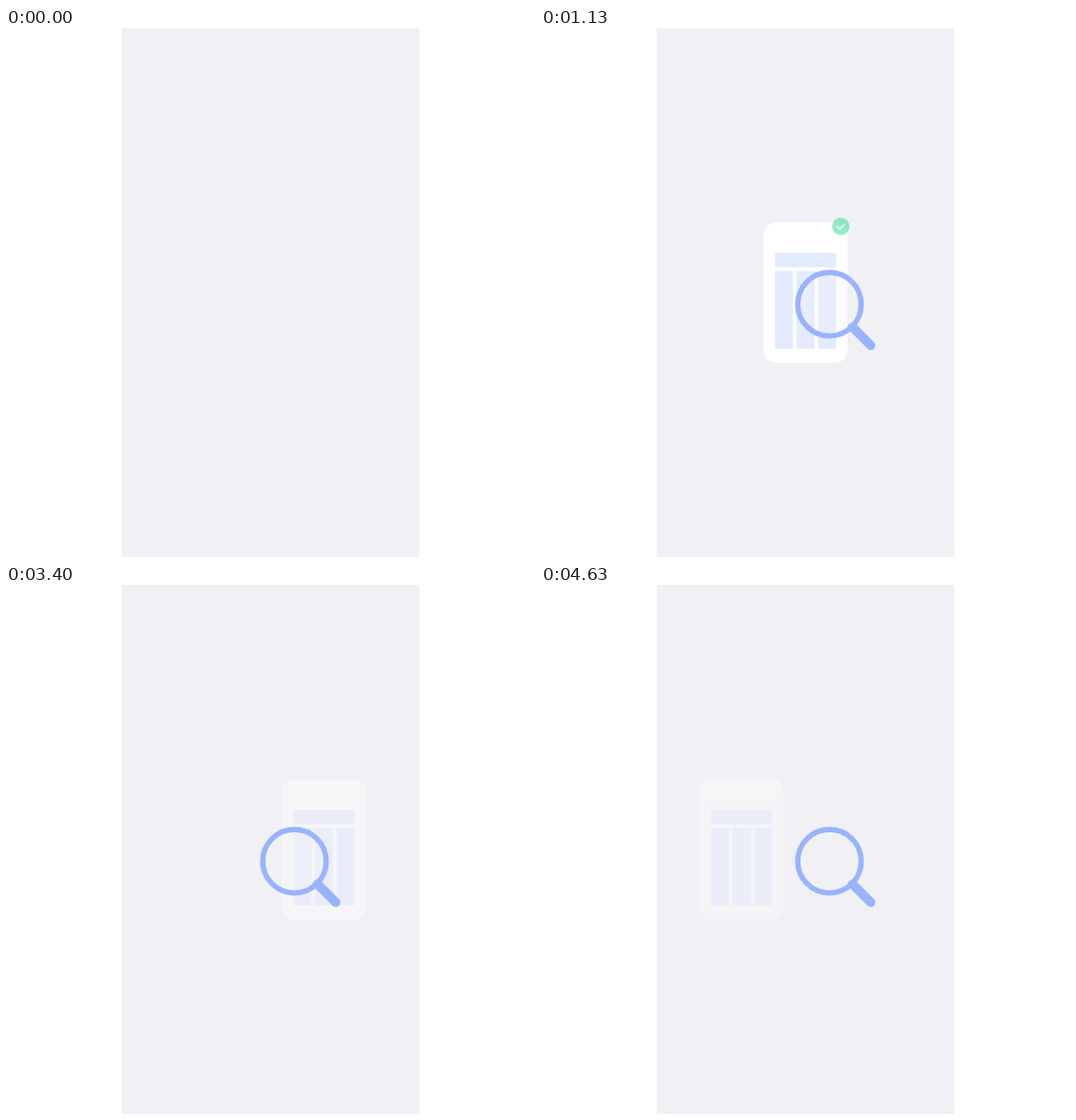
Write an HTML page that moves like this. It is 640x640 px and loops after 6.03 s.

```html
<!DOCTYPE html>
<html lang="en">
<head>
<meta charset="utf-8">
<title>Document search</title>
<style>
  html, body { margin: 0; width: 100%; height: 100%; overflow: hidden; background: #fff; }
  svg { display: block; width: 100vw; height: 100vh; }
</style>
</head>
<body>
<svg viewBox="0 0 640 640">
  <rect x="140" width="360" height="640" fill="#f0f0f5"/>
  <g id="card" opacity="0">
    <rect x="269.2" y="235" width="101.6" height="170" rx="15" fill="#fff"/>
    <g fill="#e4ebff">
      <rect x="283" y="272" width="74.2" height="17.6"/>
      <rect x="283" y="294" width="21.8" height="94.2"/>
      <rect x="309.2" y="294" width="21.8" height="94.2"/>
      <rect x="335.6" y="294" width="21.6" height="94.2"/>
    </g>
  </g>
  <g id="badge" opacity="0">
    <circle r="19" fill="#2bdd92"/>
    <path d="M-7.6 .4L-2.3 5.4L7.7 -4.6" fill="none" stroke="#fff" stroke-width="2.7" stroke-linecap="round" stroke-linejoin="round"/>
  </g>
  <g id="lens" opacity="0">
    <g transform="translate(-356 -341)" stroke="#98b4ff">
      <path d="M376.5 361.5L399 384" stroke-width="11" stroke-linecap="round"/>
      <circle cx="349" cy="334.2" r="38.4" fill="#f0f0f5" fill-opacity=".3" stroke-width="6.4"/>
    </g>
  </g>
</svg>
<script>
const LOOP = 6030, SLIDE = 600, TRAVEL = 120;
const RISE = 340, SETTLE = 160, SHRINK = 300, PEAK = 1.1;
const LENS_IN = 355;
const cycles = [
  { enter: 420, badge: 960, leave: 1545 },
  { enter: 3124, badge: 3586, leave: 4245 }
];

const [card, badge, lens] = ['card', 'badge', 'lens'].map(id => document.getElementById(id));
const ramp = (t, start, length) => Math.min(1, Math.max(0, (t - start) / length));

// Grow past full size while fading in, then settle.
function pop(t, start) {
  const rise = ramp(t, start, RISE);
  const settle = ramp(t, start + RISE, SETTLE);
  return { scale: PEAK * rise - (PEAK - 1) * settle, alpha: rise };
}

function place(el, x, y, scale, alpha) {
  el.setAttribute('transform', `translate(${x} ${y}) scale(${scale})`);
  el.setAttribute('opacity', alpha);
}

function draw(t) {
  const c = cycles[t < cycles[1].enter ? 0 : 1];
  const enter = ramp(t, c.enter, SLIDE);
  const leave = ramp(t, c.leave, SLIDE);
  place(card, TRAVEL * (1 - enter - leave), 0, 1, enter - leave);

  const tick = pop(t, c.badge);
  const keep = 1 - ramp(t, c.leave, SHRINK) ** 2;
  place(badge, 362.7, 240, tick.scale * keep, tick.alpha * keep);

  const glass = pop(t, LENS_IN);
  place(lens, 356, 341, glass.scale, glass.alpha);
}

const began = performance.now();
function frame() {
  draw((performance.now() - began) % LOOP);
  requestAnimationFrame(frame);
}
frame();
</script>
</body>
</html>
```
